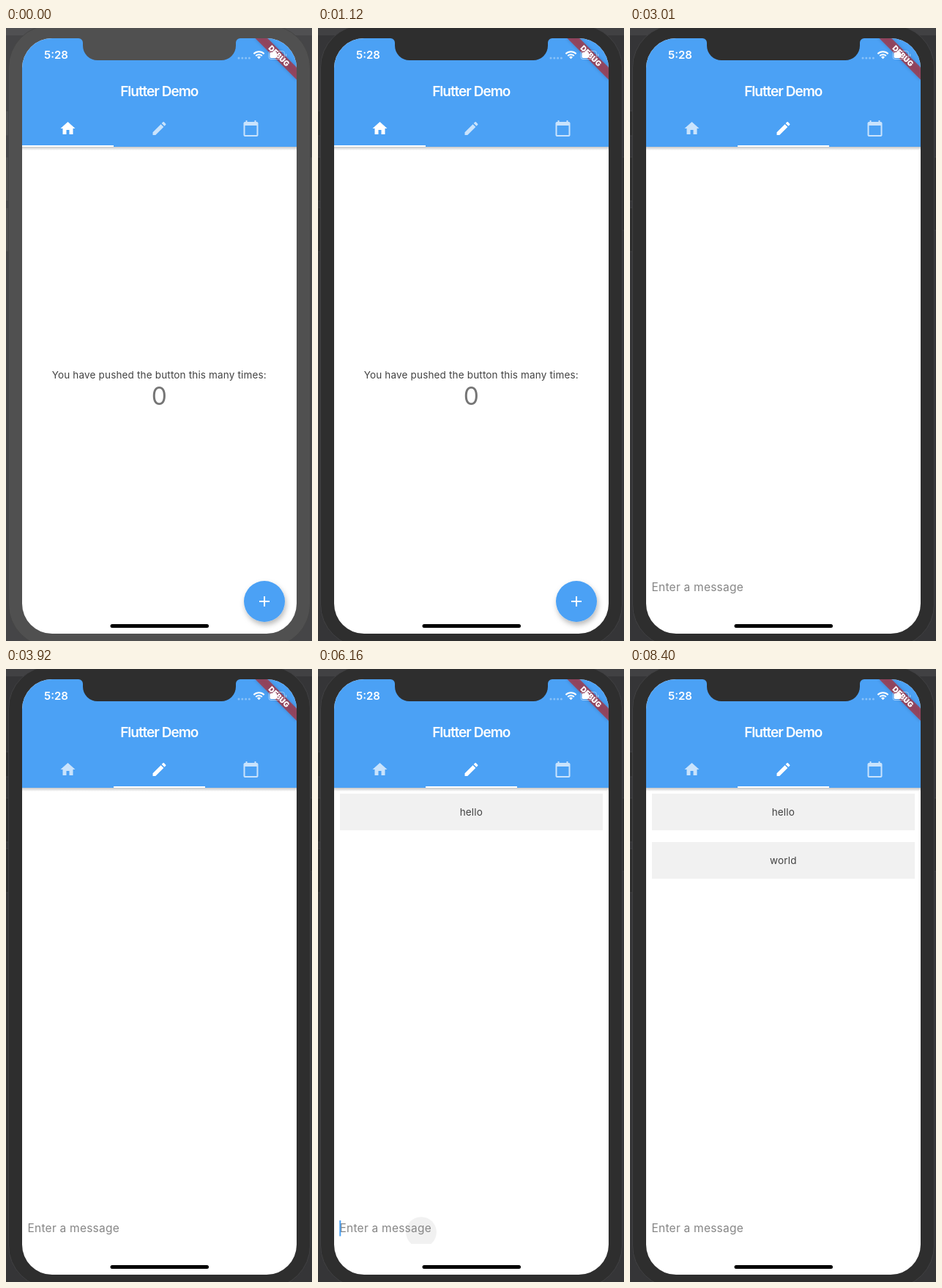
Animation of 418 by 836 pixels, one loop 8470 ms. Source, as an HTML page:

```html
<!DOCTYPE html>
<html lang="en">
<head>
<meta charset="utf-8">
<title>Flutter Demo</title>
<style>
  html, body { margin: 0; width: 100%; height: 100%; overflow: hidden; background: #3a3a3c; }
  svg { display: block; width: 418px; height: 836px; --bezel: #2e2e2e; --edge: #414143; --desk: #353537; }
  svg.idle { --bezel: #505050; --edge: #454545; --desk: #454547; }
  text { font-family: Inter, "Open Sans", sans-serif; }
  .desk { fill: var(--desk); }
  .bezel { fill: var(--bezel); }
  .body { fill: var(--bezel); stroke: var(--edge); }
  .mid { text-anchor: middle; }
  .small { font-size: 13.5px; letter-spacing: .165px; fill: #424242; }
  .input { font-size: 15.5px; letter-spacing: .24px; fill: #333; }
  .hint { fill: #868686; }
  .card { fill: #f1f1f1; }
  .blue { fill: #4ba1f5; }
  .white { fill: #fff; }
</style>
</head>
<body>
<svg id="stage" viewBox="0 0 418 836">
  <defs>
    <clipPath id="screen"><rect x="22" y="14" width="375" height="812" rx="41"/></clipPath>
    <clipPath id="tab"><rect x="147" y="113" width="125" height="49"/></clipPath>
    <clipPath id="field"><rect x="30" y="740" width="359" height="44"/></clipPath>
    <linearGradient id="fade" x2="0" y2="1">
      <stop stop-color="#000" stop-opacity=".22"/>
      <stop offset="1" stop-color="#000" stop-opacity="0"/>
    </linearGradient>
    <filter id="lift" x="-30%" y="-30%" width="160%" height="170%">
      <feDropShadow dx="1.5" dy="4" stdDeviation="3.5" flood-opacity=".28"/>
    </filter>
    <filter id="glow" x="-20%" y="-60%" width="140%" height="220%">
      <feDropShadow dx="0" dy="0" stdDeviation="2.5" flood-opacity=".3"/>
    </filter>
  </defs>

  <rect class="desk" width="418" height="836"/>
  <rect class="white" width="418" height="10" opacity=".06"/>
  <g class="body">
    <rect x="-3" y="113" width="8" height="34"/>
    <rect x="-3" y="176" width="8" height="60"/>
    <rect x="-3" y="245" width="8" height="60"/>
    <rect x="413" y="176" width="8" height="100"/>
    <rect x="3.5" y="-4" width="412" height="848" rx="58"/>
  </g>

  <g clip-path="url(#screen)">
    <rect class="white" x="22" y="14" width="375" height="812"/>

    <g id="home">
      <text class="small mid" x="209.3" y="478">You have pushed the button this many times:</text>
      <text class="mid" x="209.3" y="514" font-size="33.5" fill="#757575">0</text>
      <circle class="blue" cx="353" cy="782" r="28" filter="url(#lift)"/>
      <path class="white" d="M352 775h2v6h6v2h-6v6h-2v-6h-6v-2h6z"/>
    </g>

    <g id="chat">
      <g id="first">
        <rect class="card" x="30" y="170" width="359" height="50"/>
        <text class="small mid" x="209.3" y="199.7">hello</text>
      </g>
      <g id="second">
        <rect class="card" x="30" y="236" width="359" height="50"/>
        <text class="small mid" x="209.3" y="265.7">world</text>
      </g>
      <g clip-path="url(#field)"><circle id="splash" class="card" cx="141" cy="768"/></g>
      <text id="hint" class="input hint" x="29.5" y="768">Enter a message</text>
      <text id="typed" class="input" x="29.5" y="768"></text>
      <rect id="caret" class="blue" y="752" width="2" height="21.5"/>
    </g>

    <rect x="22" y="162" width="375" height="5" fill="url(#fade)"/>
    <rect class="blue" x="22" y="14" width="375" height="148"/>
    <g clip-path="url(#tab)"><circle id="ripple" class="white" cx="209" cy="137"/></g>
    <text class="white mid" x="209.3" y="93" font-size="19" font-weight="600" letter-spacing="-.98">Flutter Demo</text>
    <g class="white">
      <path id="homeIcon" transform="translate(72.5 125)" d="M10 20v-6h4v6h5v-8h3L12 3 2 12h3v8z"/>
      <path id="editIcon" transform="translate(197.5 125)" d="M3 17.25V21h3.75L17.81 9.94l-3.75-3.75L3 17.25zM20.71 7.04c.39-.39.39-1.02 0-1.41l-2.34-2.34c-.39-.39-1.02-.39-1.41 0l-1.83 1.83 3.75 3.75 1.83-1.83z"/>
      <path opacity=".7" transform="translate(322.5 125)" d="M20 3h-1V1h-2v2H7V1H5v2H4c-1.1 0-2 .9-2 2v16c0 1.1.9 2 2 2h16c1.1 0 2-.9 2-2V5c0-1.1-.9-2-2-2zm0 18H4V8h16v13z"/>
      <rect id="bar" x="22" y="160" width="125" height="2"/>
    </g>

    <g transform="translate(397 14) rotate(45)">
      <rect x="-40" y="28" width="80" height="12" fill="#b71c1c" fill-opacity=".63" filter="url(#glow)"/>
      <text class="white mid" y="37.700" font-size="10.2" font-weight="900">DEBUG</text>
    </g>

    <g class="white">
      <text x="52" y="42.4" font-size="15" font-weight="600">5:28</text>
      <g opacity=".35">
        <circle cx="318" cy="41" r="1.5"/><circle cx="322.8" cy="41" r="1.5"/>
        <circle cx="327.6" cy="41" r="1.5"/><circle cx="332.4" cy="41" r="1.5"/>
      </g>
      <path d="M345.5 42.3l-2.5-2.6a3.6 3.6 0 0 1 5 0z"/>
      <g fill="none" stroke="#fff" stroke-width="2">
        <path d="M341.2 38a6.2 6.2 0 0 1 8.6 0M338.4 35.2a10.1 10.1 0 0 1 14.2 0"/>
        <rect x="359" y="31.5" width="21.5" height="11" rx="3" stroke-width="1" opacity=".45"/>
      </g>
      <rect x="360.5" y="33" width="9.5" height="8" rx="1.8"/>
      <path opacity=".45" d="M382 35v4q1.5-.6 1.5-2t-1.5-2z"/>
    </g>
    <rect x="142.5" y="813" width="134.5" height="5" rx="2.5"/>
  </g>
  <path class="bezel" d="M99 13v1a6 6 0 0 1 6 6v4a20 20 0 0 0 20 20h169a20 20 0 0 0 20-20v-4a6 6 0 0 1 6-6v-1z"/>
</svg>
<script>
const LOOP = 8470;
const FOCUS = 980, TAP = 1330, SLIDE = 1470, SPLASH = 6020;
// Input steps: time, typed text, field focused
const STEPS = [
  [0, '', 0], [3220, '', 1],
  [4060, 'h', 1], [4200, 'he', 1], [4410, 'hel', 1], [4600, 'hell', 1], [4830, 'hello', 1],
  [5110, '', 0], [6090, '', 1],
  [6790, 'w', 1], [6930, 'wo', 1], [7070, 'wor', 1], [7280, 'worl', 1], [7420, 'world', 1],
  [7630, '', 0]
];
const [SENT_1, SENT_2] = STEPS.filter(([t, , on]) => t && !on).map(s => s[0]);

const $ = id => document.getElementById(id);
const set = (id, name, value) => $(id).setAttribute(name, value);
const show = (id, on) => set(id, 'opacity', +on);
const mix = (a, b, k) => a + (b - a) * k;
const ramp = (t, from, to) => Math.min(1, Math.max(0, (t - from) / (to - from)));

// Same curve as CSS "ease", solved by bisection
function ease(x) {
  const curve = (a, b, u) => 3 * a * u * (1 - u) ** 2 + 3 * b * u * u * (1 - u) + u ** 3;
  let lo = 0, hi = 1;
  for (let i = 0; i < 20; i++) {
    const u = (lo + hi) / 2;
    if (curve(.25, .25, u) < x) lo = u; else hi = u;
  }
  return x <= 0 ? 0 : x >= 1 ? 1 : curve(.1, 1, lo);
}

function drawTabs(t) {
  const k = ease(ramp(t, SLIDE, SLIDE + 300));
  set('home', 'transform', `translate(${-375 * k} 0)`);
  set('chat', 'transform', `translate(${375 * (1 - k)} 0)`);
  set('bar', 'x', mix(22, 147, k));
  show('homeIcon', mix(1, .7, k));
  show('editIcon', mix(.7, 1, k));
  set('ripple', 'r', t < TAP ? 0 : mix(5, 70, ramp(t, TAP, SLIDE + 230)));
  show('ripple', .2 * (1 - ramp(t, SLIDE + 100, SLIDE + 450)));
}

function drawField(t) {
  const [since, text, on] = STEPS.findLast(s => s[0] <= t);
  $('typed').textContent = text;
  show('hint', !text);
  const beat = (t - since) % 1000;
  const glow = beat < 500 ? 1 - ramp(beat, 420, 500) : ramp(beat, 920, 1000);
  const width = text ? $('typed').getComputedTextLength() : 0;
  set('caret', 'x', 29.3 + width);
  show('caret', on * glow);

  const age = t - SPLASH;
  const r = age < 140 ? mix(6, 20.5, age / 140) : mix(20.5, 150, ramp(age, 140, 500));
  set('splash', 'r', age < 0 ? 0 : r);
  show('splash', 1 - ramp(age, 210, 500));
}

function draw(t) {
  $('stage').classList.toggle('idle', t < FOCUS);
  drawTabs(t);
  drawField(t);
  show('first', t >= SENT_1);
  show('second', t >= SENT_2);
}

const start = performance.now();
function tick() {
  draw((performance.now() - start) % LOOP);
  requestAnimationFrame(tick);
}
tick();
</script>
</body>
</html>
```
